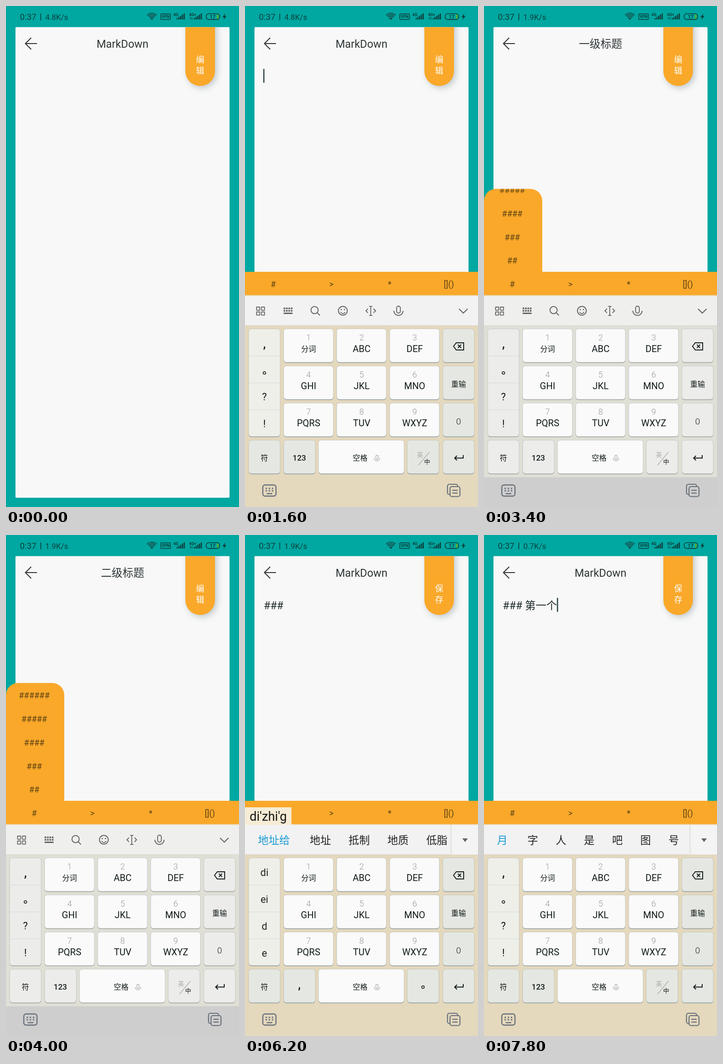
Animation, 504 px wide and 1080 px high, one loop 8 s. Source, as an HTML page with a canvas:

```html
<!DOCTYPE html>
<html lang="zh-CN">
<head>
<meta charset="utf-8">
<title>MarkDown</title>
<style>
  html, body { margin: 0; width: 100%; height: 100%; overflow: hidden; background: #00a8a1; }
  canvas { display: block; width: 100vw; height: 100vh; }
</style>
</head>
<body>
<canvas id="stage" width="504" height="1080"></canvas>
<script>
const ctx = document.getElementById('stage').getContext('2d');
const LOOP = 8000, STEP = 200;
const FONT = 'Roboto, "Noto Sans CJK SC", "Noto Sans CJK", sans-serif';
const TEAL = '#00a8a1', ORANGE = '#f9a82a', PAPER = '#f8f8f8', INK = '#111a1a', ICON = '#666';
const OPEN_MENU = 3400, INSERT = 5000, COMMIT = 6800;

const SHORT_D = '的 都 对 等 大 到 多';
const SHORT_DI = '第 低 地 滴 底 弟 迪';
// [start, composed letters, candidates]
const TYPING = [
  [0, '', ''],
  [2000, 'd', SHORT_D],
  [2200, 'di', SHORT_DI],
  [2800, 'd', SHORT_D],
  [3000, '', ''],
  [5400, 'd', SHORT_D],
  [5600, 'di', SHORT_DI],
  [5800, "di'y", '第一 地址 抵制 地质 低脂'],
  [6000, "di'zhi", '地址 第一 抵制 地质 低脂'],
  [6200, "di'zhi'g", '地址给 地址 抵制 地质 低脂'],
  [6400, "di'yi'ge", '第一个 第一 地址 抵制 地质'],
  [COMMIT, '', '月 字 人 是 吧 图 号']
];
const TITLES = [[0, 'MarkDown'], [OPEN_MENU, '一级标题'], [3800, '二级标题'], [4400, '三级标题'], [INSERT, 'MarkDown']];
const SPEEDS = [[0, '4.8K/s'], [3000, '1.9K/s'], [7000, '0.7K/s']];

const at = (list, t) => list.filter(item => item[0] <= t).pop();
const clamp = v => Math.max(0, Math.min(1, v));
const easeOut = v => 1 - (1 - clamp(v)) ** 3;

// y is the optical middle of the line
function text(s, x, y, size, color = INK, align = 'center', weight = 400) {
  ctx.font = `${weight} ${size}px ${FONT}`;
  ctx.fillStyle = color;
  ctx.textAlign = align;
  ctx.fillText(s, x, y + size * 0.36);
  return ctx.measureText(s).width;
}

function rect(x, y, w, h, color) {
  ctx.fillStyle = color;
  ctx.fillRect(x, y, w, h);
}

function round(x, y, w, h, r, fill, stroke, width = 2) {
  ctx.beginPath();
  ctx.roundRect(x, y, w, h, r);
  if (fill) { ctx.fillStyle = fill; ctx.fill(); }
  if (stroke) { ctx.strokeStyle = stroke; ctx.lineWidth = width; ctx.stroke(); }
}

function line(points, color = ICON, width = 2) {
  ctx.beginPath();
  points.forEach(p => ctx.lineTo(p[0], p[1]));
  ctx.strokeStyle = color;
  ctx.lineWidth = width;
  ctx.stroke();
}

function arc(x, y, r, from, to, color = ICON, width = 2) {
  ctx.beginPath();
  ctx.arc(x, y, r, from * Math.PI, to * Math.PI);
  ctx.strokeStyle = color;
  ctx.lineWidth = width;
  ctx.stroke();
}

function shape(points, color) {
  ctx.beginPath();
  points.forEach(p => ctx.lineTo(p[0], p[1]));
  ctx.fillStyle = color;
  ctx.fill();
}

function signal(x, label, arrows) {
  const color = '#0d3f3d';
  text(label, x, 18.5, 8.5, color, 'left', 700);
  const left = x + (arrows ? 10 : 7);
  for (let i = 0; i < 5; i++) {
    const h = 3 + i * 2.5;
    rect(left + i * 3.8, 29 - h, 2.6, h, color);
  }
  if (arrows) {
    line([[x + 3, 29], [x + 3, 24], [x + 1.5, 26]], color, 1);
    line([[x + 6, 24], [x + 6, 29], [x + 7.5, 27]], color, 1);
  }
}

function statusBar(t) {
  const color = '#0d3f3d';
  text('0:37', 30, 23.5, 18.5, color, 'left');
  rect(74.5, 16, 1.6, 15, color);
  text(at(SPEEDS, t)[1], 85, 23.5, 16.8, color, 'left');
  [4, 7.5, 11, 14.5].forEach(r => arc(315.5, 30, r, 1.25, 1.75, '#17504e', 2));
  shape([[313, 27], [318, 27], [315.5, 30]], color);
  round(334.7, 16.7, 21, 12.3, 1.5, null, color, 1.5);
  text('VPN', 345.2, 23, 8.5, color, 'center', 700);
  signal(362, '4G', false);
  signal(396, '4G+', true);
  rect(456, 18.5, 4, 9, '#4caf38');
  round(432.8, 16.5, 29.5, 12.6, 6, null, color, 1.6);
  text('17', 447, 23, 11, color, 'center', 700);
  shape([[474.5, 16], [468, 24.2], [472, 24.2], [470.5, 30], [477, 21.5], [473, 21.5]], color);
}

function sheet(t) {
  round(20.5, 45.5, 463, 1014.5, 1.5, PAPER);
  line([[67, 81], [42, 81]], '#333', 2);
  line([[54.5, 68.5], [42, 81], [54.5, 93.5]], '#333', 2);
  text(at(TITLES, t)[1], 252, 82, 23.4, '#2d3535');

  ctx.save();
  ctx.beginPath();
  ctx.rect(370, 45.5, 113.5, 160);
  ctx.clip();
  ctx.shadowColor = 'rgba(70,95,105,.32)';
  ctx.shadowBlur = 14;
  ctx.shadowOffsetX = 4;
  ctx.shadowOffsetY = 4;
  round(388, 30, 64, 142.5, [0, 0, 32, 32], ORANGE);
  ctx.restore();
  [...(t >= INSERT ? '保存' : '编辑')].forEach((c, i) => text(c, 420, 116 + i * 24, 18, '#fff'));

  const body = t >= COMMIT ? '### 第一个' : t >= INSERT ? '### ' : '';
  const width = text(body, 40.5, 152, 23, '#1c2626', 'left');
  const epoch = t < INSERT ? 200 : 4700;
  const menu = t >= OPEN_MENU && t < INSERT;
  if (t >= 400 && !menu && Math.floor((t - epoch) / 500) % 2 === 0) {
    rect(39.5 + width + (body ? 1 : 0), 135.5, 2.6, 30, '#2b4548');
  }
}

function menu(t) {
  if (t < OPEN_MENU || t >= INSERT) return;
  const top = 573 - 254 * easeOut((t - OPEN_MENU + 100) / 300);
  round(0, top, 126, 575 - top, [26, 26, 0, 0], ORANGE);
  ctx.save();
  ctx.beginPath();
  ctx.rect(0, top, 126, 575 - top);
  ctx.clip();
  for (let n = 2; n <= 6; n++) text('#'.repeat(n), 61, 650.5 - n * 50.8, 18, '#5c4012');
  ctx.restore();
}

function markBar(composed) {
  rect(0, 573, 504, 52, ORANGE);
  rect(0, 623, 504, 2, '#ecd3a2');
  ['#', '>', '*', '[]()'].forEach((s, i) => text(s, [61, 187, 313, 441][i], 600, 18, '#5c4012'));
  if (!composed) return;
  ctx.font = `400 27px ${FONT}`;
  rect(0, 587, ctx.measureText(composed).width + 20, 38, '#f6ecd5');
  text(composed, 10, 606.5, 27, '#151515', 'left');
}

function mic(x, y, s, color, width) {
  round(x - 4 * s, y - 10 * s, 8 * s, 15 * s, 4 * s, null, color, width);
  arc(x, y, 10 * s, 0, 1, color, width);
}

function toolbar() {
  [25, 35.5].forEach(x => [649, 659.5].forEach(y => round(x, y, 6.8, 6.8, 0.5, null, ICON, 1.8)));
  for (let i = 0; i < 4; i++) {
    rect(83.5 + i * 5.2, 650, 3.6, 3.6, ICON);
    rect(83.5 + i * 5.2, 655.3, 3.6, 3.6, ICON);
  }
  rect(83.5, 661, 19.4, 3, ICON);
  arc(150.5, 655.5, 7.8, 0, 2);
  line([[156, 661], [162, 667]]);
  arc(211.7, 657, 9.6, 0, 2);
  arc(211.7, 658, 5, 0.1, 0.9, ICON, 1.8);
  rect(207, 653, 2.4, 2.6, ICON);
  rect(214, 653, 2.4, 2.6, ICON);
  line([[272, 648], [272, 667]], ICON, 1.8);
  line([[268.5, 647.5], [275.5, 647.5]], ICON, 1.8);
  line([[268.5, 667], [275.5, 667]], ICON, 1.8);
  line([[266, 652.5], [261.5, 657], [266, 661.5]], ICON, 1.8);
  line([[278, 652.5], [282.5, 657], [278, 661.5]], ICON, 1.8);
  mic(332, 657, 1, ICON, 1.9);
  line([[463, 653], [472.2, 662], [481.5, 653]], ICON, 2.2);
}

function candidates(words) {
  let x = 28;
  words.split(' ').forEach((word, i) => {
    x += text(word, x, 658, 23, i ? '#222' : '#1a9ad2', 'left') + (i ? 38 : 43);
  });
  rect(444, 625, 60, 64, '#f4f4f4');
  rect(444, 625, 3.5, 64, '#e6e7e3');
  shape([[470, 654], [482, 654], [476, 662]], '#666');
}

function key(x, y, w, h, fill, edge) {
  round(x, y + 1.5, w, h, 6, edge);
  round(x, y, w, h, 6, fill, 'rgba(140,155,160,.45)', 0.8);
}

const comma = (x, y) => text(',', x, y - 5, 26, INK, 'center', 500);
const stop = (x, y) => arc(x, y, 2.8, 0, 2, INK, 1.5);

function sideColumn(composed) {
  for (let i = 1; i < 4; i++) rect(8, 696 + i * 58, 68, 1, '#d3dadb');
  if (composed) {
    const parts = composed === 'd' ? ['d', 'e', 'f', '3'] : ['di', 'ei', 'd', 'e'];
    parts.forEach((s, i) => text(s, 42, 727.5 + i * 58, 21.5, '#222'));
  } else {
    comma(42, 733);
    stop(42, 791);
    text('?', 42, 842, 22);
    text('!', 42, 900, 22);
  }
}

function keyboard(t, composed, words) {
  const dim = t >= OPEN_MENU && t < INSERT;
  const side = dim ? '#ececea' : '#e5e8e2';
  const edge = dim ? '#a9aaa5' : '#98a5a8';
  const white = '#fafafa';
  rect(0, 625, 504, 455, dim ? '#e0dfd6' : '#e4d8bd');
  rect(0, 625, 504, 64, dim ? '#efefed' : '#f2f2f2');
  rect(0, 688.5, 504, 1, '#d5d2c7');
  if (words) candidates(words); else toolbar();

  key(8, 696, 68, 232, dim ? side : '#eeefe8', edge);
  sideColumn(composed);

  ['分词', 'ABC', 'DEF', 'GHI', 'JKL', 'MNO', 'PQRS', 'TUV', 'WXYZ'].forEach((s, i) => {
    const x = 83.5 + (i % 3) * 114.8, y = 696 + Math.floor(i / 3) * 80;
    key(x, y, 107.5, 72, white, edge);
    text(i + 1, x + 54, y + 19, 18, '#999', 'center', 300);
    text(s, x + 54, y + 43, i ? 20 : 16, INK);
  });

  [696, 776, 856, 936].forEach(y => key(428, y, 68, 72, side, edge));
  ctx.beginPath();
  [[451, 733.5], [457, 726], [473, 726], [473, 741.5], [457, 741.5]].forEach(p => ctx.lineTo(...p));
  ctx.closePath();
  ctx.strokeStyle = INK;
  ctx.lineWidth = 1.9;
  ctx.stroke();
  line([[460.5, 730], [467.5, 737]], INK, 1.9);
  line([[467.5, 730], [460.5, 737]], INK, 1.9);
  text('重输', 462, 815, 16, INK, 'center', 500);
  text('0', 462, 895, 19, '#222', 'center', 300);
  line([[472, 968], [472, 974.5], [454, 974.5]], INK, 2);
  line([[458.5, 969.5], [453.5, 974.5], [458.5, 979.5]], INK, 2);

  key(8, 936, 68, 72, side, edge);
  key(83.5, 936, 68.5, 72, side, edge);
  key(159, 936, 185, 72, white, edge);
  key(351, 936, 68.5, 72, side, edge);
  text('符', 42, 974, 16, INK, 'center', 500);
  text('空格', 249, 974, 16, INK, 'center', 500);
  mic(285.5, 974.5, 0.62, '#aaa', 1.3);
  if (composed) {
    comma(117.5, 974);
    stop(385, 974.5);
  } else {
    text('123', 117.5, 974, 17, INK, 'center', 500);
    text('英', 378.5, 967, 13, '#aaa');
    line([[375, 990], [399, 961.5]], '#aaa', 1.2);
    text('中', 394, 982, 13, INK, 'center', 500);
  }
  navBar(dim);
}

function navBar(dim) {
  const bg = dim ? '#cecece' : '#e4d8bd', color = '#69717a';
  rect(0, 1016, 504, 64, bg);
  round(38.5, 1032.5, 28.5, 24, 5, null, color, 2.4);
  for (let i = 0; i < 3; i++) {
    rect(44.5 + i * 6.8, 1038.5, 3, 3, color);
    rect(44.5 + i * 6.8, 1043.5, 3, 3, color);
  }
  rect(47, 1050, 12, 2.4, color);
  round(438, 1031, 22, 22, 4, null, color, 2.2);
  round(443.5, 1036, 21.5, 21.5, 4, bg, color, 2.2);
  line([[448.5, 1044], [460, 1044]], color, 2.2);
  line([[448.5, 1050], [460, 1050]], color, 2.2);
}

function draw(t) {
  const [, composed, words] = at(TYPING, t);
  rect(0, 0, 504, 1080, TEAL);
  statusBar(t);
  sheet(t);
  const rise = easeOut((t - 200) / 400);
  if (!rise) return;
  ctx.save();
  ctx.translate(0, Math.round(507 * (1 - rise)));
  menu(t);
  markBar(composed);
  keyboard(t, composed, words);
  ctx.restore();
}

const start = performance.now();
let shown = -1;
function tick() {
  const t = Math.floor(((performance.now() - start) % LOOP) / STEP) * STEP;
  if (t !== shown) draw(shown = t);
  requestAnimationFrame(tick);
}
tick();
</script>
</body>
</html>
```
